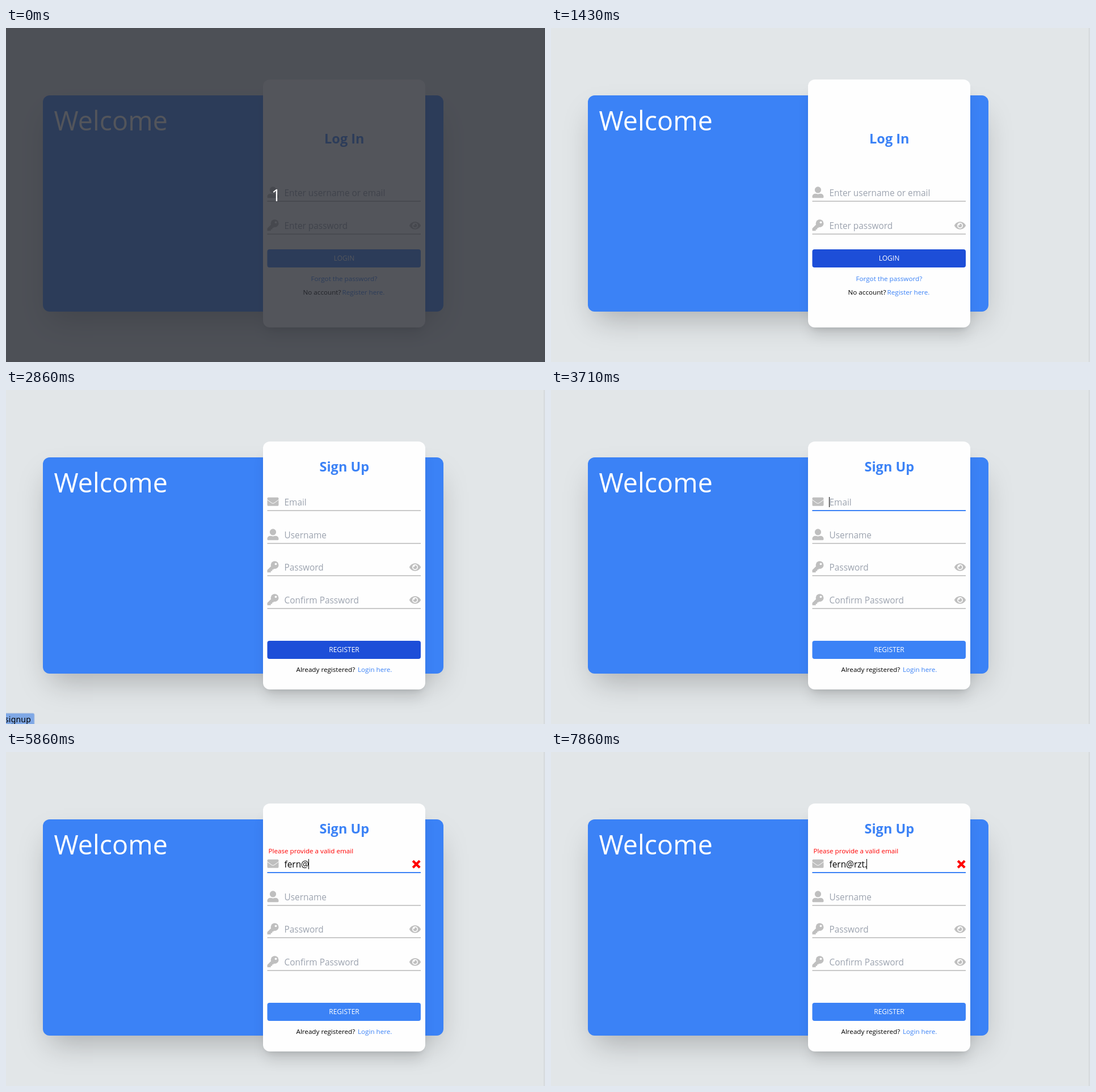
An HTML page for the animation above (8 s loop, 950x590 px).

```html
<!DOCTYPE html>
<html lang="en">
<head>
<meta charset="utf-8">
<title>Login and sign up</title>
<style>
  html, body { margin: 0; width: 100%; height: 100%; overflow: hidden; background: #e2e6e8; }
  .card { position: absolute; border-radius: 12px; }
  #back { left: 65px; top: 118.5px; width: 706px; height: 382px; background: #3b82f6;
    box-shadow: 0 25px 50px -12px rgba(0, 0, 0, .25); }
  #front { left: 453px; top: 91px; width: 286px; height: 437.5px; background: #fefefe;
    box-shadow: 0 20px 25px -5px rgba(0, 0, 0, .1), 0 8px 10px -6px rgba(0, 0, 0, .1); }
  svg { position: absolute; left: 0; top: 0; }
  text { font-family: "Open Sans", "Noto Sans", sans-serif; white-space: pre; }
  .title { font-size: 23.5px; font-weight: 700; fill: #3b82f6; text-anchor: middle; }
  .field { font-size: 15.4px; fill: #9ca3af; }
  .typed { fill: #000; }
  .btn { font-size: 12px; fill: #fff; text-anchor: middle; }
  .small { font-size: 11.67px; }
  .link { fill: #3b82f6; }
</style>
</head>
<body>
<div class="card" id="back"></div>
<div class="card" id="front"></div>
<svg width="950" height="590" viewBox="0 0 950 590">
  <defs>
    <path id="user" fill="#bfbfbf" transform="scale(.0390625)" d="M256 288a144 144 0 1 0 0-288a144 144 0 0 0 0 288zM384 320h-55q-73 32-146 0h-55a128 128 0 0 0-128 128v16a48 48 0 0 0 48 48h416a48 48 0 0 0 48-48v-16a128 128 0 0 0-128-128z"/>
    <g id="key" fill="#bfbfbf">
      <path d="M.3 15.4 7 8.7 11.7 13.8 10.6 15H8.75V16.6Q8.75 17.5 7.8 17.5H6.25V19.1Q6.25 20 5.3 20H.9Q0 20 0 19.1V16Q0 15.7 .3 15.4Z"/>
      <circle cx="13.1" cy="6.9" r="6.9"/>
      <circle cx="15" cy="5" r="1.9" fill="#fefefe"/>
    </g>
    <g id="mail">
      <rect y="2.5" width="20" height="15" rx="1.9" fill="#bfbfbf"/>
      <path d="M-.5 6.3 7.6 12.2Q10 14 12.4 12.2L20.5 6.3" fill="none" stroke="#fefefe"/>
    </g>
    <g id="eye" fill="#bfbfbf">
      <path d="M.1 9.5C2 5.8 5.7 3.3 10 3.3s8 2.5 9.9 6.2q.2 .5 0 1C18 14.2 14.3 16.7 10 16.7s-8-2.5-9.9-6.2q-.2-.5 0-1z"/>
      <circle cx="10" cy="10" r="5" fill="#fefefe"/>
      <circle cx="10" cy="10" r="3.33"/>
      <circle cx="7.9" cy="7.9" r="1.66" fill="#fefefe"/>
    </g>
  </defs>

  <path d="M948.5 0V590" stroke="#cbcfd2"/>
  <text x="84.5" y="181" font-size="46.7" fill="#fff">Welcome</text>

  <g id="login">
    <text class="title" x="596.3" y="204">Log In</text>
    <g id="loginFields"></g>
    <rect id="loginBtn" x="460.5" y="391" width="270.5" height="32" rx="4"/>
    <text class="btn" x="596" y="411">LOGIN</text>
    <text class="small link" x="537.5" y="446.5">Forgot the password?</text>
    <text class="small" x="523.5" y="470.5">No account?</text>
    <text class="small link" x="592.5" y="470.5">Register here.</text>
  </g>

  <g id="signup">
    <text class="title" x="596.3" y="144">Sign Up</text>
    <g id="signupFields"></g>
    <path id="focus" d="M460.5 213H731" stroke="#3b82f6" stroke-width="2"/>
    <text id="typed" class="field typed" x="490.5" y="204"></text>
    <rect id="caret" y="189" width="1" height="18"/>
    <g id="error">
      <text class="small" x="462.5" y="179" fill="#f00">Please provide a valid email</text>
      <path d="M717.2 192.2l12 12m0-12l-12 12" stroke="#f00" stroke-width="4.2"/>
    </g>
    <rect id="signupBtn" x="460.5" y="443" width="270.5" height="32" rx="4"/>
    <text class="btn" x="596" y="463">REGISTER</text>
    <text class="small" x="511.5" y="498">Already registered?</text>
    <text class="small link" x="620" y="498">Login here.</text>
  </g>

  <g id="status">
    <path d="M-2 571H47.5Q50 571 50 573.5V592H-2Z" fill="#7fa8e6" stroke="#b4c5de"/>
    <text x="44" y="587" font-size="14" letter-spacing=".2" text-anchor="end" style="font-family:'Noto Sans',sans-serif">signup</text>
  </g>

  <g id="dim">
    <rect width="950" height="590" fill="rgb(41,43,50)" fill-opacity=".8"/>
    <text x="468" y="305.5" font-size="29" fill="#fff">1</text>
  </g>
</svg>
<script>
const $ = id => document.getElementById(id);
const show = (id, on) => $(id).style.display = on ? '' : 'none';
const within = (t, a, b) => t >= a && t < b;

// y is the middle of the underline
const field = (y, icon, label, eye, id = '') => `
  <use href="#${icon}" x="460.5" y="${y - 25.7}"/>
  <text ${id && `id="${id}"`} class="field" x="490.5" y="${y - 9}">${label}</text>
  ${eye ? `<use href="#eye" x="711" y="${y - 25}"/>` : ''}
  <path d="M460.5 ${y}H731" stroke="#c9c9c9" stroke-width="2"/>`;

$('loginFields').innerHTML =
  field(306, 'user', 'Enter username or email') +
  field(364, 'key', 'Enter password', true);
$('signupFields').innerHTML =
  field(213, 'mail', 'Email', false, 'emailHint') +
  field(271, 'user', 'Username') +
  field(328, 'key', 'Password', true) +
  field(386, 'key', 'Confirm Password', true);

const email = 'fern@rzt.';
const keyTimes = [5000, 5140, 5290, 5430, 5860, 6710, 7000, 7140, 7860];
const caretOff = [[4430, 5000], [6430, 6710], [7710, 7860]];
const button = (id, hover) => $(id).setAttribute('fill', hover ? '#1d4ed8' : '#3b82f6');

function draw(t) {
  const count = keyTimes.filter(k => t >= k).length;
  const focused = t >= 3710;
  show('dim', t < 140);
  show('login', t < 2860);
  show('signup', t >= 2860);
  button('loginBtn', within(t, 1430, 1710));
  button('signupBtn', within(t, 2860, 3140));

  show('status', within(t, 2430, 3430));
  $('status').setAttribute('opacity', t < 3290 ? 1 : .5);

  show('focus', focused);
  show('emailHint', !count);
  show('error', count);
  $('typed').textContent = email.slice(0, count);
  show('caret', focused && !caretOff.some(([a, b]) => within(t, a, b)));
  const width = count ? $('typed').getComputedTextLength() : 0;
  $('caret').setAttribute('x', Math.round(490 + width));
}

const start = performance.now();
function tick() {
  draw((performance.now() - start) % 8000);
  requestAnimationFrame(tick);
}
tick();
</script>
</body>
</html>
```
